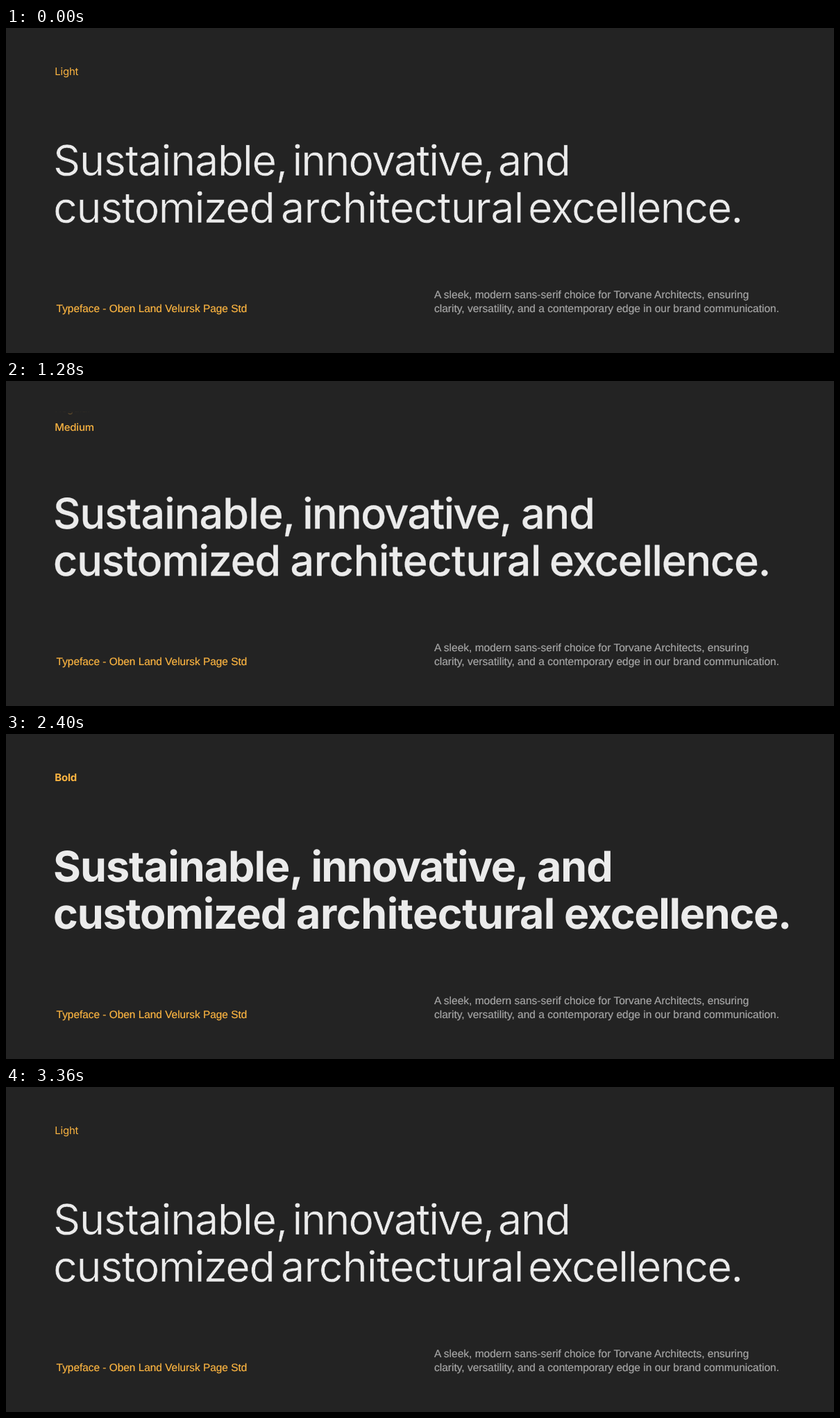
Animation of 1193 by 469 pixels, one loop 3840 ms. Source, as an HTML page:

```html
<!DOCTYPE html>
<html lang="en">
<head>
<meta charset="utf-8">
<title>Typeface weights</title>
<style>
  html, body { margin: 0; width: 100%; height: 100%; overflow: hidden; background: #232323; }
  svg { display: block; width: 1193px; height: 469px; }
  text { text-rendering: geometricPrecision; font-optical-sizing: none; white-space: pre; }
  .headline { font: 61px Inter, "Liberation Sans", sans-serif; fill: #ebebeb; stroke-linejoin: round; }
  .label { font: 15px Inter, "Liberation Sans", sans-serif; letter-spacing: -0.2px; fill: #fbb441; }
  .note { font: 15.53px "Liberation Sans", Arial, sans-serif; fill: #a6a6a6; stroke: #a6a6a6; stroke-width: 0.2; }
  .face { font-size: 15.4px; fill: #fbb441; stroke: #fbb441; }
</style>
</head>
<body>
<svg viewBox="0 0 1193 469">
  <defs>
    <linearGradient id="fade" gradientUnits="userSpaceOnUse" x1="0" y1="44" x2="0" y2="82">
      <stop offset="0" stop-color="#000"/>
      <stop offset="0.32" stop-color="#fff"/>
      <stop offset="0.7" stop-color="#fff"/>
      <stop offset="1" stop-color="#000"/>
    </linearGradient>
    <mask id="window" maskUnits="userSpaceOnUse" x="60" y="44" width="120" height="38">
      <rect x="60" y="44" width="120" height="38" fill="url(#fade)"/>
    </mask>
  </defs>
  <rect width="1193" height="469" fill="#232323"/>
  <g id="labels" mask="url(#window)"></g>
  <g id="headline"></g>
  <text class="note face" x="72.6" y="410">Typeface - Oben Land Velursk Page Std</text>
  <text class="note" x="617" y="390">A sleek, modern sans-serif choice for Torvane Architects, ensuring</text>
  <text class="note" x="617" y="410">clarity, versatility, and a contemporary edge in our brand communication.</text>
</svg>
<script>
const LOOP = 3840, HOLD = 960, MOVE = 480, STEP = 40;
const INK = '#ebebeb', PAPER = '#232323';
const LABEL_Y = 67.5, LABEL_PITCH = 27;

const styles = [
  { name: 'Light', weight: 350 },
  { name: 'Regular', weight: 430 },
  { name: 'Medium', weight: 540 },
  { name: 'Bold', weight: 700 }
];

// Each word starts at one x per style.
const words = [
  { text: 'Sustainable,', y: 213.2, tracking: -1, x: [68, 68, 68, 68] },
  { text: 'innovative,', y: 213.2, tracking: -1.7, x: [412.5, 419.5, 428.5, 439.5] },
  { text: 'and', y: 213.2, tracking: -1.1, x: [709, 724, 745, 765] },
  { text: 'customized', y: 281, tracking: -1.2, x: [68, 68, 68, 68] },
  { text: 'architectural', y: 281, tracking: -0.5, x: [396, 401, 411, 418] },
  { text: 'excellence.', y: 281, tracking: -1.3, x: [752, 765, 786, 804] }
];

const mix = (a, b, p) => a + (b - a) * p;
const easeInOut = u => u < 0.5 ? 4 * u ** 3 : 1 - 4 * (1 - u) ** 3;
const nearestCut = weight => Math.round(weight / 100) * 100;

function addText(parent, className, content) {
  const node = document.createElementNS('http://www.w3.org/2000/svg', 'text');
  node.setAttribute('class', className);
  node.textContent = content;
  document.getElementById(parent).append(node);
  return node;
}

for (const style of styles) {
  style.node = addText('labels', 'label', style.name);
  style.node.setAttribute('x', 70.2);
  style.node.style.fontWeight = nearestCut(style.weight);
}
for (const word of words) {
  word.node = addText('headline', 'headline', word.text);
  word.node.setAttribute('y', word.y);
}

function drawHeadline(from, to, p) {
  const weight = mix(styles[from].weight, styles[to].weight, p);
  const base = nearestCut(weight);
  const extra = weight - base;
  // A thin outline covers the weights between two cuts of the font.
  for (const { node, x, tracking } of words) {
    node.setAttribute('x', mix(x[from], x[to], p));
    node.style.fontWeight = base;
    node.style.letterSpacing = (tracking + extra * 0.0052) + 'px';
    node.style.stroke = extra < 0 ? PAPER : INK;
    node.style.strokeWidth = Math.abs(extra) * 0.012;
  }
}

function drawLabels(from, to, p) {
  styles.forEach(({ node }, i) => {
    const shift = i === from ? -p : i === to ? 1 - p : 2;
    node.setAttribute('y', LABEL_Y + shift * LABEL_PITCH);
    node.style.display = Math.abs(shift) < 1 ? '' : 'none';
  });
}

function draw(ms) {
  const t = Math.floor(ms % LOOP / STEP) * STEP;
  const from = Math.floor(t / HOLD);
  const to = (from + 1) % styles.length;
  const p = easeInOut(Math.min(1, t % HOLD / MOVE));
  drawHeadline(from, to, p);
  drawLabels(from, to, p);
}

const start = performance.now();
function tick(now) {
  draw(Math.max(0, now - start));
  requestAnimationFrame(tick);
}
draw(0);
requestAnimationFrame(tick);
</script>
</body>
</html>
```
